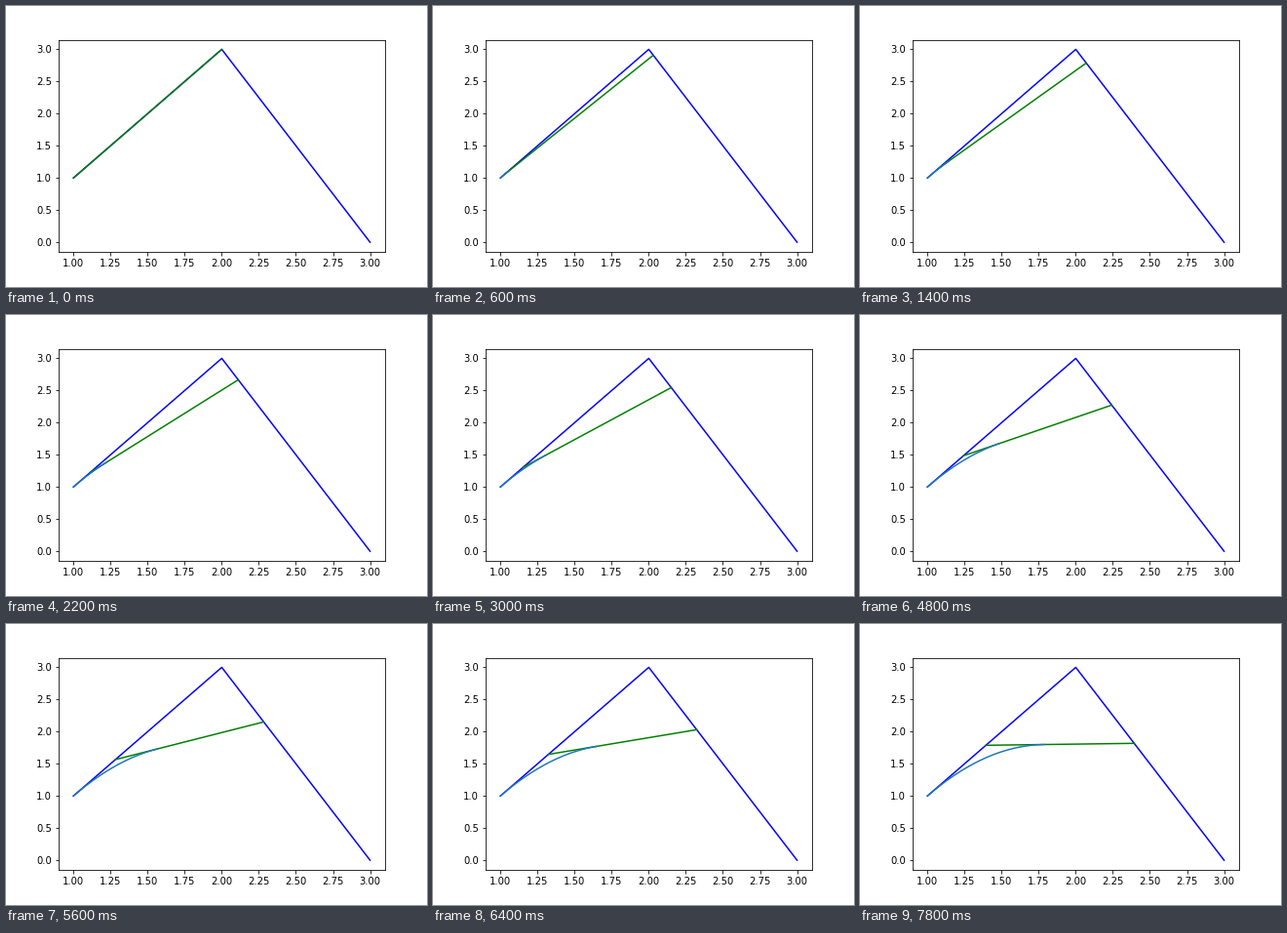
Recreate the animation shown at these times as a matplotlib script. Size 432 px wide and 288 px high, loop 8 s.

```python
import numpy as np
import matplotlib.pyplot as plt
from matplotlib.animation import FuncAnimation

FRAMES = 40
INTERVAL = 200

# Control points of a quadratic Bezier curve
P0, P1, P2 = np.array([[1, 1], [2, 3], [3, 0]], dtype=float)
ts = np.linspace(0, 1, 100)


def lerp(a, b, t):
    return a + (b - a) * t


def bezier(t):
    return lerp(lerp(P0, P1, t), lerp(P1, P2, t), t)


curve_pts = np.array([bezier(t) for t in ts])

fig, ax = plt.subplots(figsize=(6, 4), dpi=72)
fig.subplots_adjust(left=0.125, right=0.9, bottom=0.125, top=0.88)
ax.plot(*np.array([P0, P1, P2]).T, color="blue")
ax.set_xlim(0.9, 3.1)
ax.set_ylim(-0.15, 3.15)
chord, = ax.plot([], [], color="green")
curve, = ax.plot([], [], color="C0")


def update(i):
    t = ts[i]
    chord.set_data(*np.array([lerp(P0, P1, t), lerp(P1, P2, t)]).T)
    curve.set_data(*curve_pts[:i + 1].T)
    return chord, curve


anim = FuncAnimation(fig, update, frames=FRAMES, interval=INTERVAL,
                     repeat=True, repeat_delay=0)
plt.show()
```
